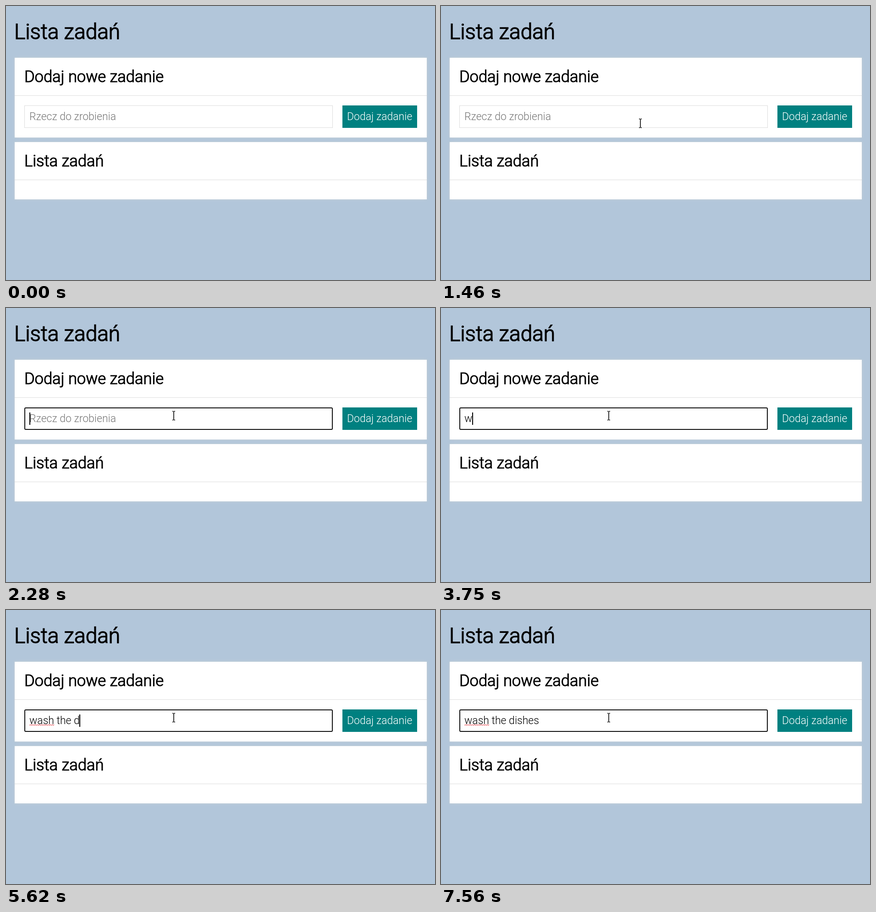
Write an HTML page that moves like this. It is 936 px wide and 598 px high and loops after 8000 ms.

```html
<!DOCTYPE html>
<html lang="pl">
<head>
<meta charset="utf-8">
<title>Lista zadań</title>
<style>
  html, body { margin: 0; width: 100%; height: 100%; overflow: hidden; }
  body { background: #b2c6da; color: #000; font: 300 23px Roboto, sans-serif; }
  #stage { position: relative; width: 936px; height: 598px; overflow: hidden; }
  #stage * { position: absolute; box-sizing: border-box; margin: 0; white-space: pre; }
  #stage h1, #stage h2 { font-weight: 300; -webkit-text-stroke: .0315em #000; }
  h1 { left: 18px; top: 29px; font-size: 2em; }
  h2 { left: 21px; top: 21px; font-size: 1.5em; }
  .card { left: 19px; width: 899px; background: #fff; box-shadow: 0 0 5px #c9d0d4; }
  .card hr { left: 0; top: 82px; width: 100%; height: 1px; border: 0; background: #ddd; }
  #field { left: 40px; top: 217px; width: 673px; height: 49px; border: 1px solid #ddd; background: #fff; }
  #field.focus { border: 2px solid #101010; border-radius: 3px; }
  #hint, #typed { left: 51px; top: 228px; }
  #hint { color: #757575; }
  #caret { top: 228px; width: 2px; height: 27px; background: #000; }
  #button { left: 734px; top: 217px; width: 163px; height: 49px; background: #008080; color: #fff; }
  #button span { left: 10px; top: 11px; }
  svg { left: 0; top: 0; overflow: visible; }
</style>
</head>
<body>
<div id="stage">
  <h1>Lista zadań</h1>
  <div class="card" style="top:113px;height:174px"><h2>Dodaj nowe zadanie</h2><hr></div>
  <div class="card" style="top:297px;height:125px"><h2>Lista zadań</h2><hr></div>
  <div id="field"></div>
  <div id="hint">Rzecz do zrobienia</div>
  <div id="typed"></div>
  <div id="caret"></div>
  <div id="button"><span>Dodaj zadanie</span></div>
  <svg width="936" height="598">
    <path id="squiggle" fill="none" stroke="#e0242c" stroke-width="1"/>
    <path id="arrow" d="M.5 .5V16.5L4.2 13L6.7 18.6L9 17.6L6.6 12.2H11.7Z" fill="#fff" stroke="#000"/>
    <path id="beam" d="M-3 -9.5H-.5M.5 -9.5H3M0 -9V9M-3 9.5H-.5M.5 9.5H3" fill="none" stroke="#000" stroke-width="1.6"/>
  </svg>
</div>
<script>
const LOOP = 8000;
const PHRASE = 'wash the dishes';
const KEYS = [3750, 3940, 4140, 4420, 4630, 4900, 5020, 5220, 5420, 5620, 5820, 6020, 6480, 6750, 7020];
const FOCUS = 2280, SPELL = 4750;
const CARET_OFF = [[2820, 3350], [7560, LOOP]];
const MOVES = [
  { start: 650, end: 1130, steps: 8, from: [764, 507], to: [436, 256] },
  { start: 1460, end: 2010, steps: 9, from: [434.5, 255.5], to: [366, 235] }
];

const $ = id => document.getElementById(id);
const show = (el, on) => { el.style.visibility = on ? 'visible' : 'hidden'; };
const ease = p => p * p * (3 - 2 * p);

let wave = 'M51 252';
for (let x = 53, up = true; x <= 105; x += 2, up = !up) wave += `L${x} ${up ? 250 : 252}`;
$('squiggle').setAttribute('d', wave);

function pointer(t) {
  const move = MOVES.filter(m => t >= m.start).pop();
  if (!move) return null;
  const last = move.steps - 1;
  const step = Math.min(last, Math.floor((t - move.start) / (move.end - move.start) * last + 1e-6));
  const p = ease(step / last);
  return move.from.map((v, i) => v + (move.to[i] - v) * p);
}

function draw(t) {
  const focused = t >= FOCUS;
  const text = PHRASE.slice(0, KEYS.filter(k => t >= k).length);
  $('field').className = focused ? 'focus' : '';
  show($('hint'), !text);
  $('typed').textContent = text;
  $('caret').style.left = 51 + Math.floor($('typed').getBoundingClientRect().width) + 'px';
  show($('caret'), focused && !CARET_OFF.some(([a, b]) => t >= a && t < b));
  show($('squiggle'), t >= SPELL);

  const pos = pointer(t);
  const inField = pos && pos[1] < 267;
  show($('arrow'), pos && !inField);
  show($('beam'), inField);
  if (pos) {
    const place = `translate(${Math.round(pos[0])} ${Math.round(pos[1])})`;
    $('arrow').setAttribute('transform', place);
    $('beam').setAttribute('transform', place);
  }
}

const begin = performance.now();
function tick() {
  draw((performance.now() - begin) % LOOP);
  requestAnimationFrame(tick);
}
draw(0);
requestAnimationFrame(tick);
</script>
</body>
</html>
```
